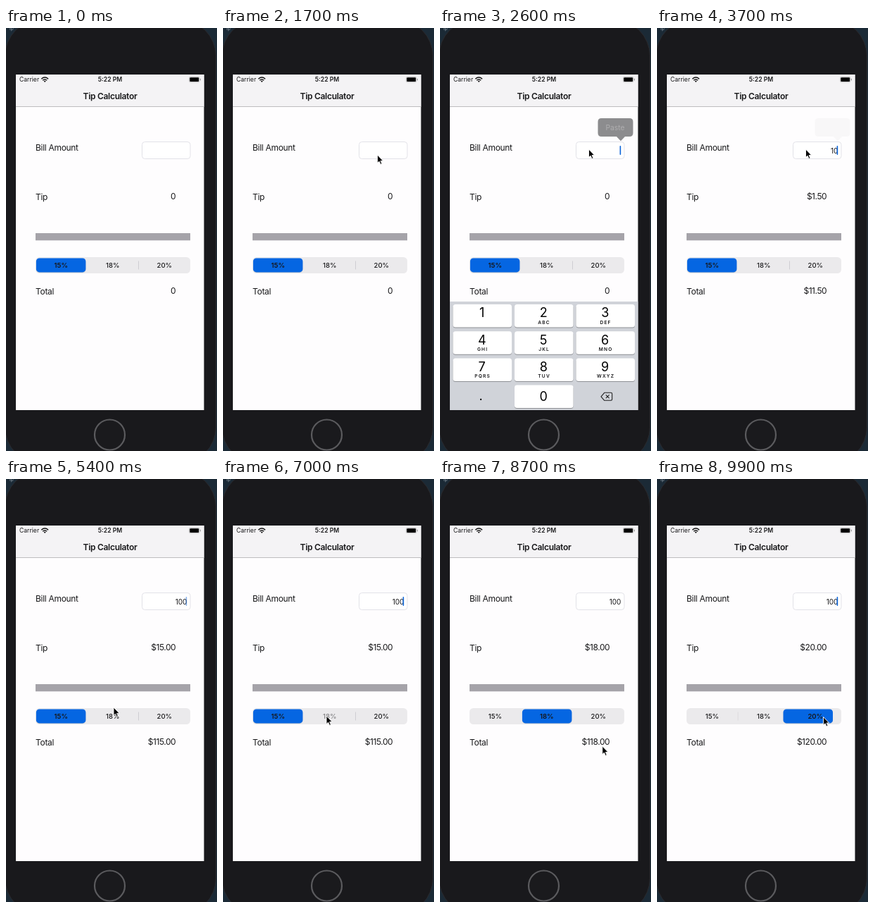
These frames come from a looping animation (300 px wide and 600 px high, 10 s). An HTML page:

```html
<!DOCTYPE html>
<html lang="en">
<head>
<meta charset="utf-8">
<title>Tip Calculator</title>
<style>
  html, body { margin: 0; width: 100%; height: 100%; overflow: hidden; background: #19191c; }
  svg { display: block; width: 300px; height: 600px; }
  text { font-family: Inter, "Liberation Sans", sans-serif; font-size: 12px; letter-spacing: -.3px; fill: #171719; }
  .mid { text-anchor: middle; }
  .end { text-anchor: end; }
  .value { letter-spacing: -.45px; }
  .title { font-weight: 600; }
  .status { font-size: 8.6px; letter-spacing: 0; }
  .entry { font-size: 10px; letter-spacing: -.05px; }
  .seg { font-size: 9.5px; letter-spacing: 0; font-weight: 500; }
  .digit { font-size: 18px; letter-spacing: 0; fill: #000; }
  .sub { font-size: 6.6px; letter-spacing: 1.2px; font-weight: 600; }
  .paste { font-size: 10.3px; letter-spacing: 0; fill: #fff; }
</style>
</head>
<body>
<svg viewBox="0 0 300 600">
  <defs><clipPath id="screen"><rect x="14" y="66" width="267.5" height="476"/></clipPath></defs>

  <rect width="300" height="600" fill="#1b2a36"/>
  <text x="5" y="3" style="font-size:7px;fill:#8795a0">ip</text>
  <rect x="-1.5" y="-12" width="300" height="630" rx="52" fill="#19191c" stroke="#2a2a2e"/>
  <circle cx="147.5" cy="577" r="21.5" fill="#1a1a1d" stroke="#5b5b5e" stroke-width="2.2"/>

  <g clip-path="url(#screen)">
    <rect x="14" y="66" width="268" height="476" fill="#fefdfe"/>
    <rect x="14" y="66" width="268" height="45.5" fill="#f4f3f5"/>
    <rect x="14" y="111" width="268" height="1" fill="#bdbcbf"/>

    <text class="status" x="19" y="76.3">Carrier</text>
    <g fill="none" stroke="#111" stroke-width="1.5">
      <path d="M50.3 72.3Q55.2 67.8 60.1 72.3M52.2 74.3Q55.2 71.6 58.2 74.3"/>
      <path d="M53.6 75.3Q55.2 74 56.8 75.3L55.2 77z" fill="#111" stroke="none"/>
    </g>
    <text class="status title mid" x="148" y="76.3">5:22 PM</text>
    <rect x="260.4" y="69.4" width="14.6" height="7.4" rx="1.9" fill="none" stroke="#aaa" stroke-width=".7"/>
    <rect x="261.3" y="70.2" width="12.8" height="5.8" rx="1" fill="#000"/>
    <rect x="275.8" y="71.7" width="1" height="2.8" rx=".5" fill="#999"/>
    <text class="title mid" x="148" y="100.5">Tip Calculator</text>

    <text x="42" y="173.5">Bill Amount</text>
    <text x="42" y="244">Tip</text>
    <text x="42" y="378">Total</text>
    <rect x="193.5" y="161.5" width="68.5" height="24" rx="4" fill="#fff" stroke="#e2e2e8"/>
    <text class="entry end" id="bill" x="257.3" y="177.6"></text>
    <rect id="caret" x="255.6" y="167" width="1.6" height="13" rx=".8" fill="#0a63d8"/>
    <text class="value end" id="tip" x="241.2" y="243.3"></text>
    <text class="value end" id="total" x="241.2" y="377.3"></text>
    <rect x="42" y="291" width="220" height="10.3" fill="#a5a3a9"/>

    <rect x="42" y="325" width="220" height="23" rx="5.5" fill="#ebeaec"/>
    <g fill="#cfced2">
      <rect id="div0" x="114.6" y="330.5" width="1" height="12"/>
      <rect id="div1" x="188" y="330.5" width="1" height="12"/>
    </g>
    <rect y="327.2" width="70.5" height="20" rx="4.5" fill="#000" opacity=".1" class="pill"/>
    <rect y="326.4" width="70.5" height="20" rx="4.5" fill="#0566e2" class="pill"/>
    <g id="segs"></g>

    <g id="paste">
      <path fill="#303033" d="M229.5 128H269.5Q274.5 128 274.5 133V149Q274.5 154 269.5 154H263L257 160.3 251 154H229.5Q224.5 154 224.5 149V133Q224.5 128 229.5 128z"/>
      <text class="paste mid" id="pasteText" x="249" y="145">Paste</text>
    </g>
    <g id="pad"></g>
  </g>

  <path id="cursor" fill="#000" stroke="#fff" stroke-width=".9" stroke-linejoin="round"
    d="M0 0V11.6L2.6 9.2 4.5 13.4 6.4 12.6 4.6 8.5H8.2z"/>
</svg>

<script>
const $ = id => document.getElementById(id);
const clamp = v => Math.min(1, Math.max(0, v));
const easeOut = p => 1 - (1 - clamp(p)) ** 2.7;
const smooth = p => p * p * (3 - 2 * p);

const LOOP = 10000, STEP = 100;
const rates = [15, 18, 20];
const taps = [7100, 9700];      // segment releases
const presses = [6900, 9500];
const keys = [[3200, 1], [3500, 10], [3900, 100]];
const blinks = [[2900, 3300], [4500, 5000], [5400, 6000], [6500, 7000],
                [7400, 7900], [8400, 8900], [9400, 9900]];
// time, x, y of the pointer tip
const path = [[900, 246, 322], [1500, 219.5, 180], [1900, 219.5, 180], [2400, 211.5, 172],
              [4400, 211.5, 172], [5000, 153, 319], [5300, 153, 319], [5600, 153, 338],
              [6700, 153, 338], [6900, 147, 336], [7700, 147, 336], [8400, 233, 385],
              [8700, 230.8, 379], [8800, 230.8, 379], [9400, 236.5, 337.5]];

function buildPad() {
  const letters = ['', 'ABC', 'DEF', 'GHI', 'JKL', 'MNO', 'PQRS', 'TUV', 'WXYZ'];
  const key = (col, row, digit, sub) => {
    const x = 18.5 + col * 87.5, y = 392 + row * 38.2, mid = x + 41.7;
    return `<rect x="${x}" y="${y + 1}" width="83.5" height="32.5" rx="3.5" fill="#8f9196"/>
      <rect x="${x}" y="${y}" width="83.5" height="32.5" rx="3.5" fill="#fff"/>
      <text class="digit mid" x="${mid - .5}" y="${y + (row < 3 ? 18.4 : 22.8)}">${digit}</text>
      <text class="sub mid" x="${mid + .4}" y="${y + 28}">${sub}</text>`;
  };
  $('pad').innerHTML = '<rect x="14" y="388" width="268" height="154" fill="#d0d3d9"/>' +
    letters.map((s, i) => key(i % 3, Math.floor(i / 3), i + 1, s)).join('') + key(1, 3, 0, '') +
    `<text class="digit mid" x="58" y="528">.</text>
     <path d="M229 522.8L233.7 517.3H243Q244.7 517.3 244.7 519V526.6Q244.7 528.3 243 528.3H233.7z
       M235.8 520.4L240.6 525.2M240.6 520.4L235.8 525.2" fill="none" stroke="#222" stroke-width="1.1" stroke-linejoin="round"/>`;
}

function pointerAt(t) {
  const i = path.findIndex(p => p[0] > t);
  if (i < 0) return path[path.length - 1].slice(1);
  if (i === 0) return path[0].slice(1);
  const [a, b] = [path[i - 1], path[i]];
  const p = smooth((t - a[0]) / (b[0] - a[0]));
  return [1, 2].map(k => a[k] + (b[k] - a[k]) * p);
}

function caretAt(t) {
  if (t < 2000) return 0;
  const gap = blinks.find(([a, b]) => t >= a && t <= b);
  return gap ? clamp(Math.max((gap[0] + 100 - t) / 200, (t - gap[1] + 200) / 200)) : 1;
}

function draw(t) {
  const bill = keys.reduce((v, [at, n]) => t >= at ? n : v, 0);
  const sel = taps.filter(at => t >= at).length;
  const slide = taps.reduce((s, at) => s + easeOut((t - at) / 400), 0);
  const tip = bill * rates[sel] / 100;
  const money = v => bill ? '$' + v.toFixed(2) : '0';
  $('bill').textContent = bill || '';
  $('tip').textContent = money(tip);
  $('total').textContent = money(bill + tip);
  $('caret').setAttribute('opacity', caretAt(t));

  document.querySelectorAll('.pill').forEach(e => e.setAttribute('x', 42.9 + slide * 74));
  $('div0').setAttribute('opacity', clamp(slide - 1) * .6);
  $('div1').setAttribute('opacity', clamp(1 - slide));
  [...$('segs').children].forEach((e, i) => {
    const pressed = i && t >= presses[i - 1] && t < taps[i - 1];
    e.style.fontWeight = i === sel ? 600 : 500;
    e.setAttribute('opacity', pressed ? .5 : 1);
  });

  const fade = clamp((t - 2490) / 200) * clamp((3710 - t) / 400);
  $('paste').setAttribute('opacity', fade);
  $('pasteText').setAttribute('opacity', fade * fade);

  const up = easeOut((t - 2000) / 500) - easeOut((t - 3200) / 400);
  $('pad').setAttribute('transform', `translate(0 ${(1 - up) * 155})`);

  const [x, y] = pointerAt(t);
  $('cursor').setAttribute('transform', `translate(${x} ${y})`);
  $('cursor').setAttribute('visibility', t < 900 ? 'hidden' : 'visible');
}

buildPad();
$('segs').innerHTML = rates.map((r, i) =>
  `<text class="seg mid" x="${78.3 + i * 73.5}" y="339.8">${r}%</text>`).join('');

const start = performance.now();
function tick() {
  const t = (performance.now() - start) % LOOP;
  draw(Math.floor(t / STEP) * STEP);
  requestAnimationFrame(tick);
}
tick();
</script>
</body>
</html>
```
